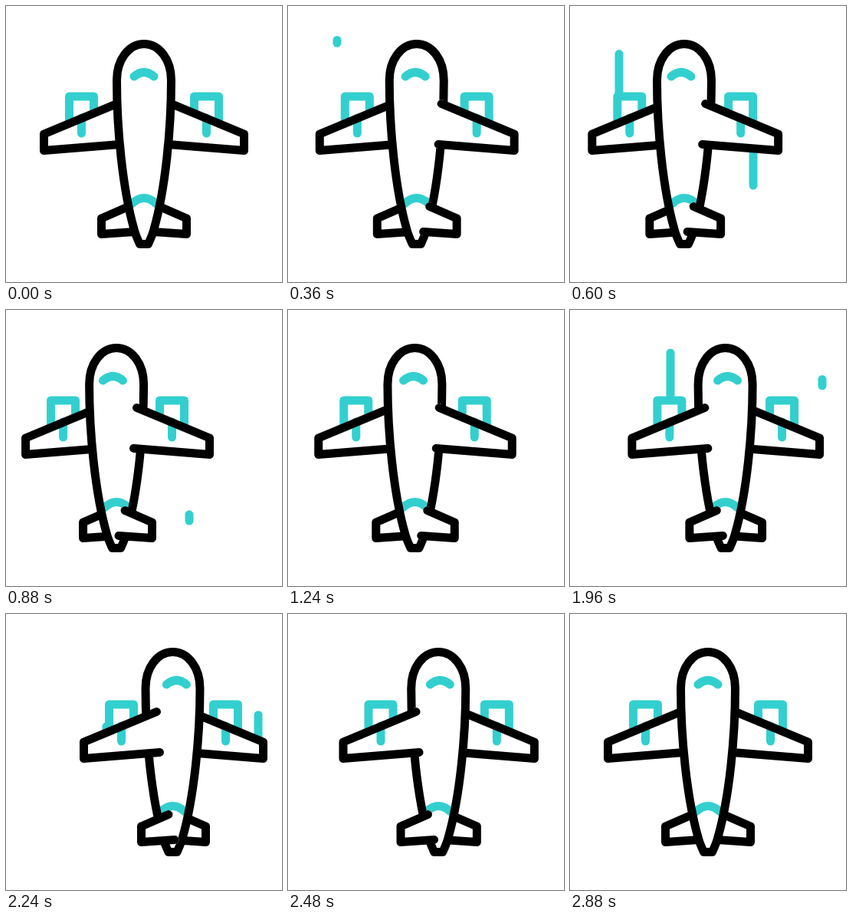
An HTML page with a canvas that plays this animation: 360x360 px, repeating every 3000 ms.

```html
<!DOCTYPE html>
<html lang="en">
<head>
<meta charset="utf-8">
<title>Plane</title>
<style>
html, body { margin: 0; width: 100%; height: 100%; overflow: hidden; background: #fff; }
canvas { display: block; width: 360px; height: 360px; }
</style>
</head>
<body>
<canvas id="stage" width="360" height="360"></canvas>
<script>
const ctx = document.getElementById('stage').getContext('2d');
const LOOP = 3000, STEP = 40;
const BLACK = '#000', CYAN = '#33cfcf', WHITE = '#fff';

const WING = [[144.5, 127.5], [49.5, 167], [49.5, 188.5], [148.5, 180.5]];
const TAIL = [[160, 261.5], [124.5, 277], [124.5, 297.5], [168, 294.5]];
const ENGINE = [[82.5, 152], [82.5, 118], [114.5, 118], [114.5, 139]];
const FLAP = [[98.5, 146], [98.5, 166]];

// x, top, bottom, start time, duration
const STREAKS = [
  [64, 44.5, 130, 320, 500],
  [239, 190, 275, 440, 500],
  [131, 56, 150, 1775, 500],
  [329, 90.5, 176, 1900, 500]
];

const clamp = u => Math.min(1, Math.max(0, u));
const smooth = u => { u = clamp(u); return u * u * (3 - 2 * u); };
const progress = (t, from, to) => smooth((t - from) / (to - from));

// Sideways bank: -1 is fully left, 1 is fully right.
function bankAt(t) {
  if (t < 780) return -progress(t, 100, 780);
  if (t < 1585) return progress(t, 780, 1580) - 1;
  if (t < 2240) return progress(t, 1590, 2240);
  return Math.pow(1 - progress(t, 2240, 2880), 2.2);
}

function stroke(path, color) {
  ctx.strokeStyle = color;
  ctx.stroke(path);
}

function polyline(points) {
  const path = new Path2D();
  points.forEach(([x, y]) => path.lineTo(x, y));
  return path;
}

// Draws in left-hand coordinates; side 1 mirrors them to the right.
function onSide(side, dx, draw) {
  ctx.save();
  ctx.translate(dx, 0);
  if (side > 0) {
    ctx.translate(360, 0);
    ctx.scale(-1, 1);
  }
  draw();
  ctx.restore();
}

function surface(points, flap) {
  const path = polyline(points);
  ctx.fillStyle = WHITE;
  ctx.fill(path);
  stroke(polyline([points[0], points[3]]), WHITE);
  if (flap) stroke(polyline(flap), CYAN);
  stroke(path, BLACK);
}

function drawWings(side, dx) {
  onSide(side, dx, () => {
    surface(WING, FLAP);
    surface(TAIL);
  });
}

function drawEngine(side, dx) {
  onSide(side, dx, () => {
    const path = polyline(ENGINE);
    ctx.fillStyle = WHITE;
    ctx.fill(path);
    stroke(path, CYAN);
  });
}

const hull = new Path2D(
  'M180 49.5 C160 49.5 144.5 70 144.5 97 C144.5 160 152 238 167 291 ' +
  'C169 299 172 305 174.5 310.5 H185.5 C188 305 191 299 193 291 ' +
  'C208 238 215.5 160 215.5 97 C215.5 70 200 49.5 180 49.5 Z');
const windshield = new Path2D('M167 92 Q180 81 193 92');
const tailArc = new Path2D('M164 258 Q180 243 196 258');

function drawBody(dx) {
  ctx.save();
  ctx.translate(dx, 0);
  ctx.fillStyle = WHITE;
  ctx.fill(hull);
  stroke(tailArc, CYAN);
  stroke(hull, BLACK);
  ctx.translate(dx * 0.13, 0);
  stroke(windshield, CYAN);
  ctx.restore();
}

function drawStreaks(t) {
  for (const [x, top, bottom, start, duration] of STREAKS) {
    const u = (t - start) / duration;
    if (u <= 0 || u >= 1) continue;
    const at = v => top + (bottom - top) * smooth(v);
    stroke(polyline([[x, at(u * 1.6 - 0.6)], [x, at(u * 1.6)]]), CYAN);
  }
}

function draw(t) {
  ctx.fillStyle = WHITE;
  ctx.fillRect(0, 0, 360, 360);
  ctx.lineWidth = 11;
  ctx.lineCap = ctx.lineJoin = 'round';

  const bank = bankAt(t);
  const near = bank * (bank < 0 ? 47 : 52);
  const far = bank * 25;
  const front = -Math.sign(bank);
  const shift = side => side === front ? near : far;

  drawStreaks(t);
  for (const side of [-1, 1]) {
    drawEngine(side, shift(side));
    if (side !== front) drawWings(side, shift(side));
  }
  drawBody(bank * 37.5);
  if (front) drawWings(front, near);
}

let origin = null;
function tick(now) {
  if (origin === null) origin = now;
  const t = (now - origin) % LOOP;
  draw(Math.floor(t / STEP) * STEP);
  requestAnimationFrame(tick);
}
draw(0);
requestAnimationFrame(tick);
</script>
</body>
</html>
```
